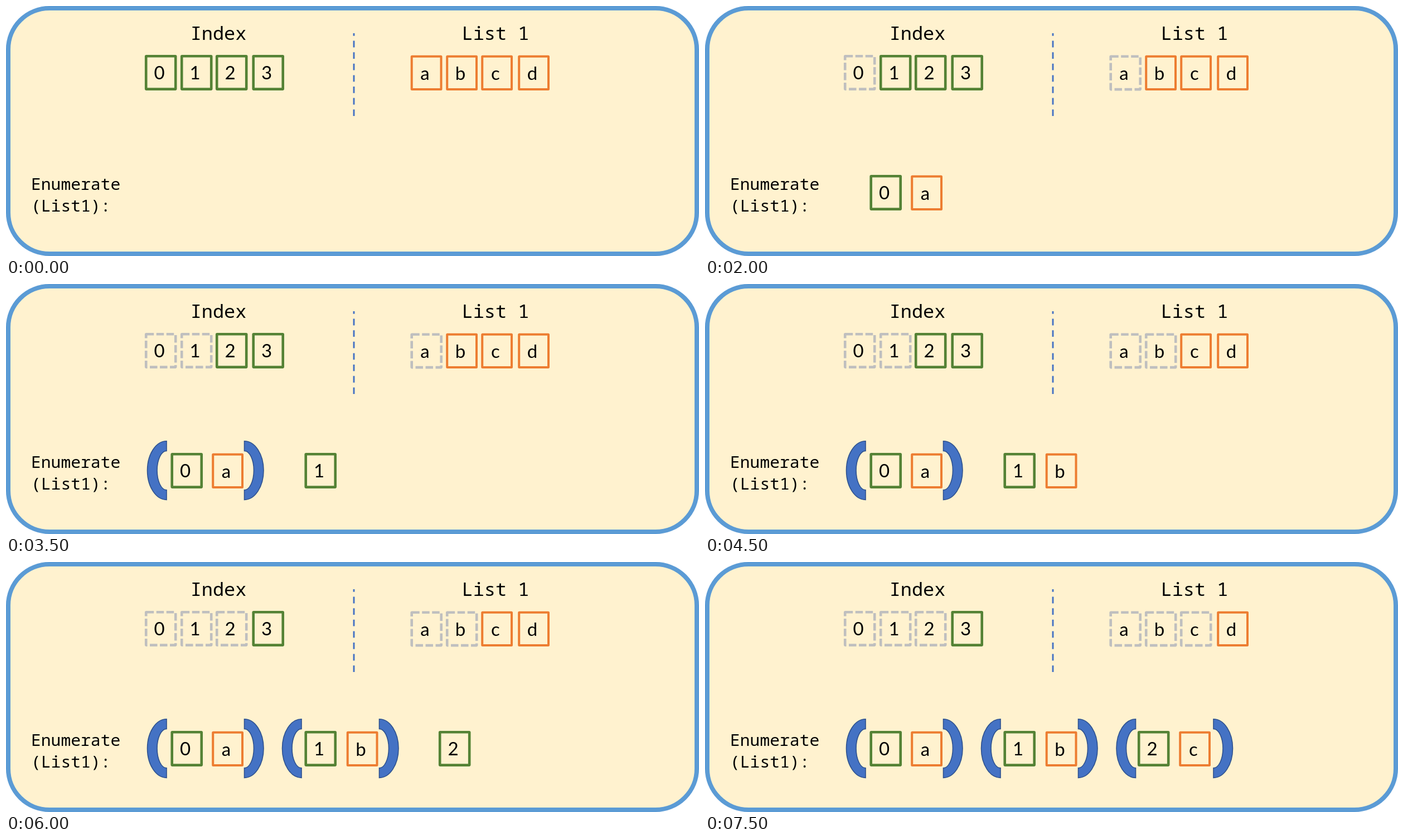
Animation of 1243x450 px, one loop 8000 ms. Source, as an HTML page:

```html
<!DOCTYPE html>
<html lang="en">
<head>
<meta charset="utf-8">
<title>Enumerate</title>
<style>
  html, body { margin: 0; width: 100%; height: 100%; overflow: hidden; background: #fff; }
  svg { display: block; width: 100%; height: 100%; }
  .code { font-family: "Noto Sans Mono", monospace; white-space: pre; }
  .title { font-size: 33.6px; text-anchor: middle; }
  .label { font-size: 29.7px; }
  .item { font: 33px Lato, sans-serif; text-anchor: middle; }
  .box { fill: none; stroke-linejoin: round; }
  .index { stroke: #548235; stroke-width: 4.6; }
  .value { stroke: #ed7d31; stroke-width: 4; }
  .taken { stroke: #bfbfbf; stroke-width: 4.6; stroke-dasharray: 13.5 4.5; }
  .paren { fill: #4472c4; stroke: #2f528f; stroke-width: 1.6; }
</style>
</head>
<body>
<svg viewBox="0 0 1243 450">
  <rect x="4" y="4" width="1235" height="442" rx="74" fill="#fff2cf" stroke="#5b9bd5" stroke-width="8"/>
  <path d="M624 198V49" stroke="#4472c4" stroke-width="2.9" stroke-dasharray="11.8 8.8"/>
  <g class="code">
    <text class="title" x="381" y="61">Index</text>
    <text class="title" x="878" y="61">List 1</text>
    <text class="label" x="45" y="331">Enumerate</text>
    <text class="label" x="45" y="370">(List1):</text>
  </g>
  <g id="scene"></g>
</svg>
<script>
const STEP = 500, LOOP = 8000, STEPS_PER_PAIR = 5;
const scene = document.getElementById('scene');

// Each item has a home corner, a midway corner and a final corner.
const indexes = [
  { text: '0', home: [249, 88], mid: [294, 212.5], end: [295.5, 304] },
  { text: '1', home: [313, 88], mid: [467, 204.5], end: [535.5, 304] },
  { text: '2', home: [376, 88], mid: [541, 176], end: [776, 304] },
  { text: '3', home: [441.5, 88] }
];
const values = [
  { text: 'a', home: [725.5, 88.5], mid: [540, 229], end: [369, 304.5] },
  { text: 'b', home: [789, 88.5], mid: [725.5, 226.5], end: [610.5, 304.5] },
  { text: 'c', home: [852, 88.5], mid: [862, 210.5], end: [850, 304.5] },
  { text: 'd', home: [918, 88.5] }
];
const parenEdges = [[288, 427.5], [530, 669.5], [772.5, 912]];

function box(kind, text, [x, y]) {
  const [w, h] = kind === 'value' ? [52.8, 59.2] : [53, 59.4];
  return `<rect class="box ${kind}" x="${x + 2.2}" y="${y + 2.2}" width="${w}" height="${h}" rx=".5"/>` +
    `<text class="item" x="${x + 26}" y="${y + 44}">${text}</text>`;
}

function paren(x, side) {
  const sweep = side < 0 ? 0 : 1;
  return `<path class="paren" d="M${x} 282.8A34.5 52.8 0 0 ${sweep} ${x} 388.4` +
    `V370.8A17 35.2 0 0 ${1 - sweep} ${x} 300.4Z"/>`;
}

function item(kind, { text, home, mid, end }, phase) {
  if (phase < 1 || !mid) return box(kind, text, home);
  return box('taken', text, home) + box(kind, text, phase < 2 ? mid : end);
}

function render(step) {
  let out = '';
  for (let i = 0; i < indexes.length; i++) {
    const phase = step - i * STEPS_PER_PAIR;
    out += item('index', indexes[i], phase) + item('value', values[i], phase - 2);
    if (phase >= 5 && parenEdges[i]) {
      const [left, right] = parenEdges[i];
      out += paren(left, -1) + paren(right, 1);
    }
  }
  scene.innerHTML = out;
}

const start = performance.now();
let shown = -1;
function tick() {
  const step = Math.floor((performance.now() - start) % LOOP / STEP);
  if (step !== shown) render(shown = step);
  requestAnimationFrame(tick);
}
tick();
</script>
</body>
</html>
```
